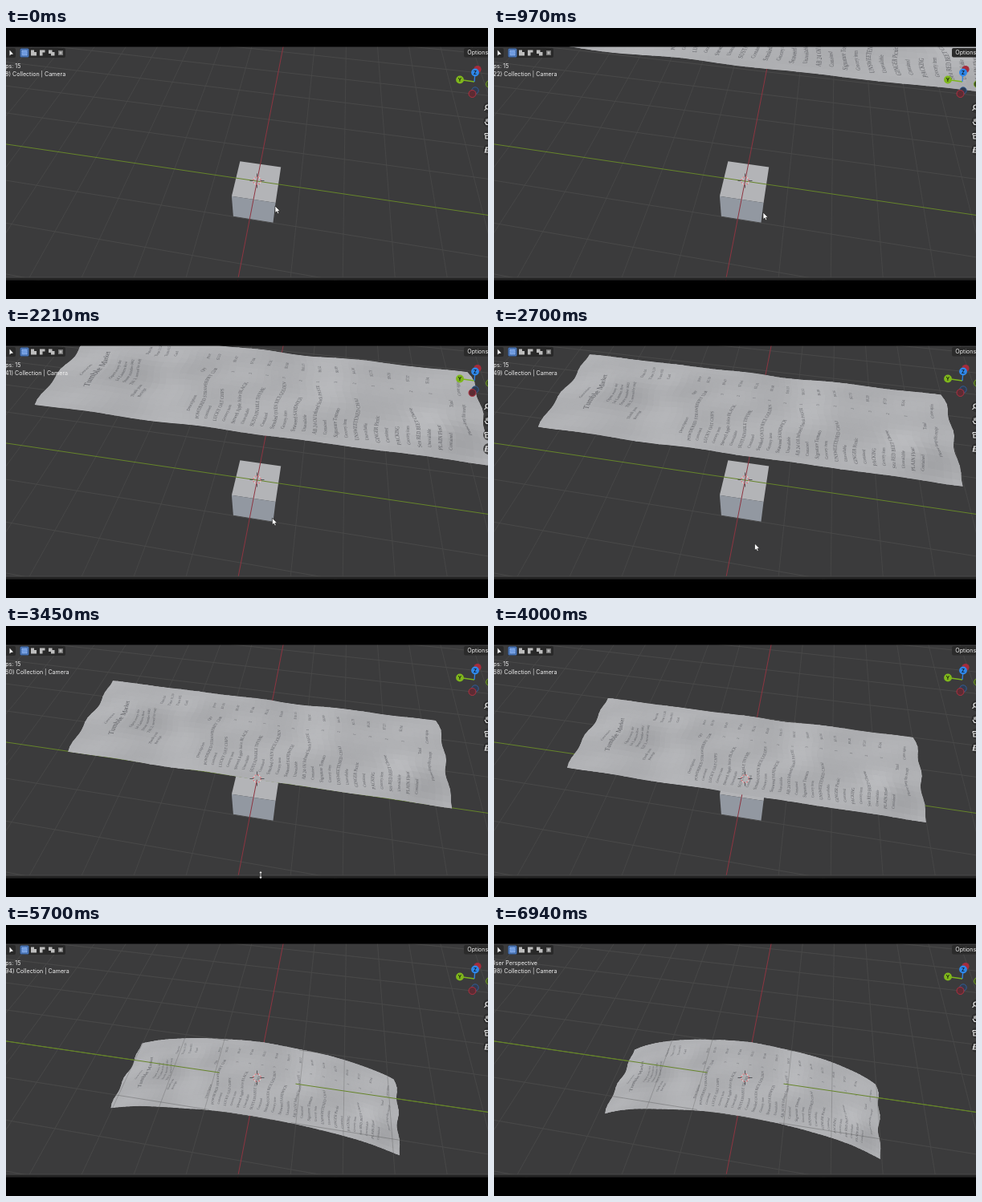
An HTML page with a canvas that plays this animation: 600x338 px, repeating every 6.97 s.

```html
<!DOCTYPE html>
<html lang="en">
<head>
<meta charset="utf-8">
<title>Falling receipt</title>
<style>
  html, body { margin: 0; width: 100%; height: 100%; overflow: hidden; background: #000; }
  canvas, svg { position: absolute; left: 0; top: 0; width: 600px; height: 338px; }
  text { font: 7.1px Inter, "Open Sans", sans-serif; fill: #f0f0f0; }
  .axis { font-size: 6px; font-weight: 600; fill: #111; text-anchor: middle; }
</style>
</head>
<body>
<canvas id="view" width="600" height="338"></canvas>
<svg viewBox="0 0 600 338">
  <!-- 3D cursor -->
  <g transform="translate(312.500 190.500)" fill="none">
    <circle r="4.800" stroke="#f4f4f4"/>
    <circle r="4.800" stroke="#c8323c" stroke-dasharray="1.9 1.9"/>
    <path d="M-9 0h5M4 0h5M0 -9v5M0 4v5" stroke="#303034" stroke-width=".7"/>
  </g>

  <!-- toolbar -->
  <rect x="-3" y="25" width="15" height="12" rx="2" fill="#292929"/>
  <path d="M4.500 27.500v7l1.700-1.600 2.800-.3z" fill="#eee"/>
  <rect x="17" y="25" width="57" height="12" rx="2" fill="#292929"/>
  <rect x="17.500" y="25.500" width="11" height="11" rx="1.500" fill="#4772b3"/>
  <rect x="20" y="28" width="6" height="6" fill="#6f9be0" stroke="#c3d8ff" stroke-width=".6" stroke-dasharray="1 1"/>
  <g fill="#bdbdbd">
    <path d="M31 27.500h4v2.500h3v4.500h-7z"/>
    <path d="M42 27.500h6.500v3h-3v4h-3.500z"/>
    <path d="M53 27.500h4.500v2.500h3v4.500h-4.500v-2.500h-3z"/>
    <path d="M65 28h6v6h-6z" fill="#777"/><path d="M66.500 29.500h3v3h-3z"/>
  </g>
  <rect x="570" y="25" width="34" height="11.500" rx="2" fill="#2b2b2b"/>
  <text x="574.300" y="33.200">Options</text>
  <text id="status" x="-3.500" y="49.700"></text>
  <text id="place" x="-3.500" y="60"></text>

  <!-- orientation gizmo -->
  <g stroke-width="1.3">
    <circle cx="587" cy="51.500" r="4.600" fill="#a52c3c"/>
    <circle cx="584" cy="78" r="4.200" fill="#2f3b50" stroke="#35609c" stroke-width=".9"/>
    <circle cx="580.500" cy="82" r="4.500" fill="#5d2b33" stroke="#b03142" stroke-width="1"/>
    <circle cx="602" cy="70" r="4.500" fill="#3e4e24" stroke="#70a020" stroke-width="1"/>
    <path d="M583 67L565 64.500" stroke="#7db51e"/>
    <path d="M583 67L584 55" stroke="#2f86e6"/>
    <circle cx="565" cy="64.500" r="4.900" fill="#7fb71c"/>
    <circle cx="584" cy="55.500" r="4.900" fill="#2e87ea"/>
    <text class="axis" x="565" y="66.700">Y</text>
    <text class="axis" x="584" y="57.700">Z</text>
  </g>

  <!-- navigation buttons -->
  <g fill="#2c2c2c" fill-opacity=".8"><circle cx="601" cy="99.500" r="7"/><circle cx="601" cy="117" r="7"/><circle cx="601" cy="134.500" r="7"/><circle cx="601" cy="152" r="7"/></g>
  <g fill="none" stroke="#ececec" stroke-width="1.200">
    <circle cx="599.500" cy="98.500" r="2.500"/><path d="M597.500 100.500l-2 2.500"/>
    <path d="M596 117l2 3.500h3M598 117v-3.500M600 117v-4"/>
    <path d="M596 131.500h5M596 131.500v2M597 134h4v4h-4z"/>
    <path d="M597 149h5M596 152h6M595.500 155h6M598 148.500l-1.500 7"/>
  </g>

  <rect y="311" width="600" height="3.500" fill="#242424"/>
  <rect y="310.500" width="600" height="1" fill="#4a4a4a"/>
  <rect width="600" height="23.500"/>
  <rect y="314.500" width="600" height="24"/>
  <path id="arrow" d="M0 0v8.500l2-1.700 1.300 2.900 1.500-.7-1.300-2.800h2.700z" fill="#fff" stroke="#111" stroke-width=".6"/>
  <path id="resize" d="M0 -5l2.200 2.800h-1.500v4.400h1.500L0 5l-2.200-2.800h1.500v-4.400h-1.500z" fill="#fff" stroke="#111" stroke-width=".5"/>
</svg>

<script>
const LOOP = 6970, STOP = 5970;
const HALF_LEN = 7.05, NEAR = -1.99, FAR = 2.13, REST = 0.05;
const view = document.getElementById('view');
const ctx = view.getContext('2d');
const el = id => document.getElementById(id);
const { sin, exp, abs, min, max, floor, round } = Math;

// Piecewise linear track: [time, value, ...]
function track(keys, t, i = 1) {
  let k = 1;
  while (k < keys.length - 1 && keys[k][0] < t) k++;
  const a = keys[k - 1], b = keys[k];
  const p = min(1, max(0, (t - a[0]) / (b[0] - a[0])));
  return a[i] + (b[i] - a[i]) * p;
}

const frameKeys = [[0, 8.1], [1670, 32.5], [2700, 49.3], [3450, 60.4], [4550, 76.5], [5700, 94.3], [STOP, 98]];
const mouseKeys = [[0, 335, 222], [700, 335, 226], [1100, 335, 232], [1670, 334, 227.5], [2100, 333, 231],
  [2700, 324.5, 270], [3000, 320, 296], [3300, 317, 308], [3450, 317, 310.5], [3900, 317, 312], [4100, 317, 330]];

// Perspective camera: u runs away along the red axis, v right along the green one, z up.
function project(u, v, z) {
  const r = 0.985 * v + 0.174 * u, f = 0.985 * u - 0.174 * v;
  const k = 427 / (16 + 0.593 * f - 0.805 * z);
  return [302.5 + k * (0.375 + r), 167.5 - k * (-0.88 + 0.805 * f + 0.593 * z)];
}

function line(a, b, color, width = 1) {
  ctx.strokeStyle = color;
  ctx.lineWidth = width;
  ctx.beginPath();
  ctx.moveTo(...project(...a, 0));
  ctx.lineTo(...project(...b, 0));
  ctx.stroke();
}

function poly(points, color) {
  ctx.fillStyle = color;
  ctx.beginPath();
  points.forEach(p => ctx.lineTo(...p));
  ctx.closePath();
  ctx.fill();
}

// Floor lines; a gap hides the strip |v| < gap.
function floorGrid(color, gap = 0) {
  const across = (u, tone) => {
    line([u, -30], [u, -gap], tone);
    line([u, gap], [u, 30], tone);
  };
  for (let v = -30; v <= 30; v += 2) if (v && abs(v) >= gap) line([-9, v], [34, v], color, 0.8);
  for (let u = -8; u <= 34; u += 2) if (u) across(u, color);
  across(0, '#66852a');
  if (!gap) line([-9, 0], [34, 0], '#8d3541');
}

function cube() {
  poly([[1, -1], [1, 1], [-1, 1], [-1, -1]].map(([u, v]) => project(u, v, 0)), '#b3b4b7');
  poly([[-1, -1, 0], [-1, 1, 0], [-1, 1, -2], [-1, -1, -2]].map(p => project(...p)), '#9298a1');
}

// Crumples in the sheet: [s, u, radius, height]
const bumps = [[-5.2, 0.8, 1.1, 0.08], [-3.4, -0.5, 1.1, -0.1], [-2.7, 0.7, 0.8, 0.08], [1.2, 0.9, 1.1, -0.09],
  [2.9, 0.5, 0.9, 0.09], [5.9, -0.7, 0.85, 0.15]];

function crumple(s, u) {
  let h = 0.018 * sin(1.9 * s + 0.8 * u) + 0.012 * sin(3.1 * u - 1.3 * s);
  for (const [bs, bu, r, a] of bumps) h += a * exp(-((s - bs) ** 2 + (u - bu) ** 2) / (r * r));
  return h;
}

let height = 0;
function sheet(s, u) {
  const drop = max(0, REST - height), q = (s / HALF_LEN) ** 2;
  const v = s * (1 - 0.0105 * drop * drop * q) + 0.06 * sin(1.5 * u + 0.9 * s) + 0.05 * sin(4.3 * u + s);
  return project(u, v, max(height, REST) - drop * q + crumple(s, u) * (drop ? 0.6 : 1));
}

const COLS = 56, ROWS = 16, cells = [];
const alongS = i => (i / COLS * 2 - 1) * HALF_LEN;
const alongU = j => NEAR + (FAR - NEAR) * j / ROWS;
for (let i = 0; i < COLS; i++) for (let j = 0; j < ROWS; j++) {
  const s = alongS(i + 0.5), u = alongU(j + 0.5), d = 0.05;
  const ds = (crumple(s + d, u) - crumple(s, u)) / d, du = (crumple(s, u + d) - crumple(s, u)) / d;
  const g = round(175 + 60 * ds - 45 * du);
  cells.push([i, j, `rgb(${g},${g + 1},${g + 4})`]);
}

function paper() {
  const pts = [];
  for (let i = 0; i <= COLS; i++) {
    pts.push([]);
    for (let j = 0; j <= ROWS; j++) pts[i].push(sheet(alongS(i), alongU(j)));
  }
  // Wide strokes close the seams; the clip keeps the outline sharp.
  ctx.save();
  ctx.beginPath();
  const outline = [...pts.map(c => c[0]), ...pts[COLS], ...pts.map(c => c[ROWS]).reverse(), ...pts[0].slice().reverse()];
  outline.forEach(p => ctx.lineTo(...p));
  ctx.clip();
  ctx.lineWidth = 2;
  for (const [i, j, color] of cells) {
    poly([pts[i][j], pts[i + 1][j], pts[i + 1][j + 1], pts[i][j + 1]], color);
    ctx.strokeStyle = color;
    ctx.stroke();
  }
  ctx.restore();
}

// Printed lines: [text, s, u, size]
const print = [
  ['Groceries', -6.15, -0.4, 0.15], ['Tumble Market', -5.7, -0.9, 0.3],
  ['Open every day', -5.15, -0.4, 0.15], ['14 Lantern Row', -4.9, -0.45, 0.15],
  ['Store number 0482', -4.65, -0.45, 0.15], ['Till 3, served by staff', -4.4, -0.5, 0.15],
  ['Thank you', -4.1, -1.05, 0.15], ['Receipt', -3.88, -1.0, 0.15],
  ['Date 04', -4.3, 1.1, 0.16], ['Time 11:20', -3.95, 1.05, 0.16], ['Trans 815', -3.6, 1.1, 0.16], ['Card', -3.25, 1.15, 0.16],
  ['Description', -2.05, -1.4, 0.16], ['Qty', -2.05, 0.5, 0.15], ['Price', -2.05, 1.25, 0.15],
  ['Total', 6.2, 0.2, 0.16], ['Please keep this receipt', 6.55, -1.0, 0.15], ['Come again', 6.55, 0.8, 0.15]
];
const items = ['POWDERED STRAWBERRY 12oz', 'LUCKY OAT CHIPS', 'Stewed Apple Juice BLACK', 'SUSTAINABLE THYME',
  'Smoked OVEN RICE GOLDEN', 'Seaweed SANDWICH', 'AB 24 Oil Infused Snack PASTE', 'Signature Tomato', 'UNSWEETENED CHAI',
  'GINGER Picnic', 'PACKING', 'Sea RED BEET Cheese', 'PLAIN Flour'];
const notes = ['Contained', 'Unavailable', 'Grocery item'];
items.forEach((name, i) => {
  const s = -1.7 + i * 0.61;
  print.push([name, s, -1.7, 0.17], [notes[i * 2 % 3], s + 0.29, -1.65, 0.145]);
  print.push([String(1 + i * 5 % 3), s, 0.72, 0.15], ['$' + (2 + i * 7 % 9) + '.' + (10 + i * 37 % 90), s, 1.28, 0.15]);
});

function printing() {
  ctx.font = '10px "Liberation Serif", "Noto Serif", serif';
  ctx.fillStyle = 'rgba(66,67,72,.75)';
  const e = 0.04;
  for (const [text, s, start, size] of print) {
    const k = size / 10, m = k / e;
    let u = start;
    for (const ch of text) {
      const p = sheet(s, u), pu = sheet(s, u + e), ps = sheet(s + e, u);
      ctx.setTransform((pu[0] - p[0]) * m, (pu[1] - p[1]) * m, (ps[0] - p[0]) * m, (ps[1] - p[1]) * m, p[0], p[1]);
      ctx.fillText(ch, 0, 0);
      u += ctx.measureText(ch).width * k;
    }
  }
  ctx.resetTransform();
}

function pointer(t) {
  const x = track(mouseKeys, t), y = track(mouseKeys, t, 2);
  const edge = y > 306;
  for (const [id, on] of [['arrow', !edge], ['resize', edge]]) {
    el(id).setAttribute('transform', `translate(${x} ${y})`);
    el(id).style.display = on && y < 318 ? '' : 'none';
  }
}

function draw(now) {
  const t = now % LOOP;
  const n = floor(track(frameKeys, t));
  height = 6.78 - 0.1335 * (n - 32);

  ctx.fillStyle = '#3b3b3c';
  ctx.fillRect(0, 0, 600, 338);
  if (n < 86) cube();
  floorGrid('#494949');
  if (n > 9) {
    paper();
    printing();
  }
  if (height < -0.2) floorGrid('rgba(73,73,73,.35)', 1.8);

  el('status').textContent = t < STOP ? 'fps: 15' : 'User Perspective';
  el('place').textContent = `(${n}) Collection | Camera`;
  pointer(t);
}

const begin = performance.now();
function tick() {
  draw(performance.now() - begin);
  requestAnimationFrame(tick);
}
tick();
</script>
</body>
</html>
```
